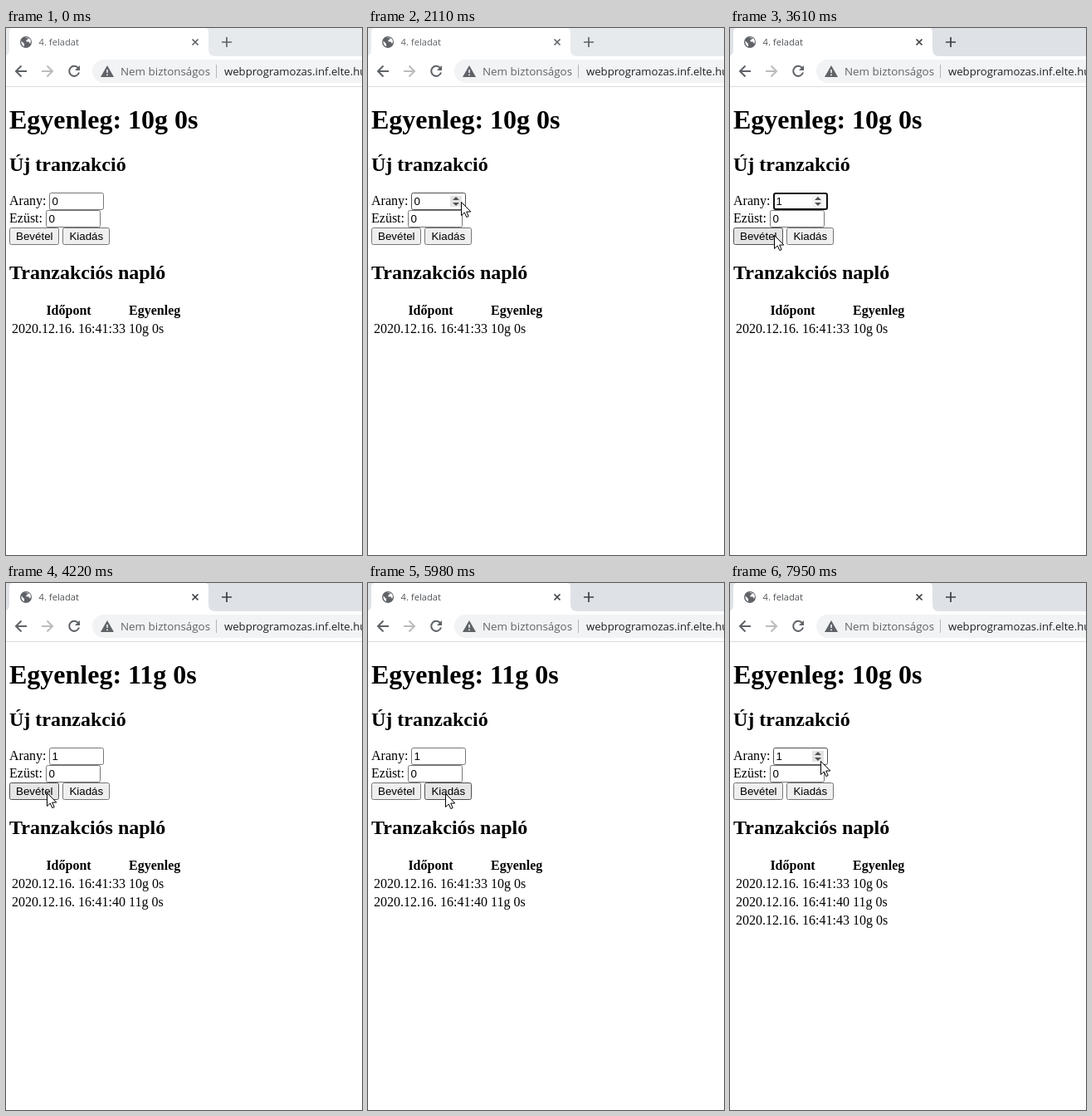
An HTML page that plays this animation: 429 by 634 pixels, repeating every 8000 ms.

```html
<!DOCTYPE html>
<html lang="hu">
<head>
<meta charset="utf-8">
<title>4. feladat</title>
<style>
  html, body { margin: 0; width: 100%; height: 100%; overflow: hidden; background: #fff; }
  svg { display: block; }
  .ui { font: 13.15px "Open Sans", sans-serif; }
  .serif { font: 16px "Liberation Serif", serif; }
  .serif .h1 { font-size: 32px; font-weight: bold; }
  .serif .h2 { font-size: 24px; font-weight: bold; }
  .serif .th { font-weight: bold; text-anchor: middle; }
  .form { font: 13.333px "Liberation Sans", sans-serif; }
  .btn { text-anchor: middle; }
</style>
</head>
<body>
<svg width="429" height="634" viewBox="0 0 429 634">
  <g class="ui">
    <rect id="strip" width="429" height="34"/>
    <path d="M-4 34Q4 34 4 26V5Q4 1 7 0H241Q244 1 244 5V26Q244 34 252 34Z" fill="#fff"/>
    <circle cx="24" cy="17" r="7" fill="#5f6368"/>
    <path d="M18.5 15.5l3.5 3.5v3.2q-4-1.700-3.500-6.700zM22.500 11.600h4v1.900l-2 1v2h3l1.500 2.500q2-3.500-.5-6.300" fill="#fff"/>
    <text id="tabTitle" x="39.600" y="21" font-size="11.2">4. feladat</text>
    <path id="tabIcons" d="M224.500 13.500l7 7m0-7l-7 7M260 17h12M266 11v12" fill="none" stroke-width="1.700"/>
    <rect y="70" width="429" height="1" fill="#dadce0"/>
    <g fill="none" stroke="#5f6368" stroke-width="2">
      <path d="M25 52H12.500M18.500 45.500L12 52l6.500 6.500"/>
      <path d="M43 52H55.500M49.500 45.500L56 52l-6.500 6.500" stroke="#babcbe"/>
      <path d="M87 48.200A6 6 0 1 0 88 53.500"/>
    </g>
    <path d="M89 45v6h-6z" fill="#5f6368"/>
    <rect x="104" y="38" width="345" height="28" rx="14" fill="#f1f3f4"/>
    <path d="M122 45l8 14h-16z" fill="#5f6368"/>
    <path d="M122 50v4m0 1.500v1.700" stroke="#f1f3f4" stroke-width="1.600"/>
    <text x="138" y="57" font-size="13.4" fill="#5f6368">Nem biztonságos</text>
    <rect x="253" y="44" width="1" height="16" fill="#b4b7ba"/>
    <text x="263" y="57" fill="#202124">webprogramozas.inf.elte.hu</text>
  </g>
  <g class="serif">
    <text id="balance" class="h1" x="4" y="121"></text>
    <text class="h2" x="4" y="172">Új tranzakció</text>
    <text x="4" y="213">Arany:</text>
    <text x="4" y="234">Ezüst:</text>
    <text class="h2" x="4" y="302">Tranzakciós napló</text>
    <text class="th" x="75.500" y="345">Időpont</text>
    <text class="th" x="179.200" y="345">Egyenleg</text>
    <g id="log"></g>
  </g>
  <g id="form" class="form"></g>
  <path id="cursor" d="M.5 .5V16.500L4.300 13L6.800 18.600L9.200 17.500L6.700 12H11.800Z" fill="#fff" stroke="#000"/>
</svg>
<script>
const LOOP = 8000;
const $ = id => document.getElementById(id);

// start, end, steps, x, y, easing power
const moves = [
  [400, 1110, 16, 307, 496, 1.5],
  [1158, 1160, 1, 290, 477, 1],
  [1210, 2010, 18, 118, 212, -1.5],
  [2060, 2107, 2, 112, 209, 1],
  [2155, 2250, 3, 106, 203, -1.5],
  [3080, 3607, 12, 53, 249, 0],
  [3655, 3750, 3, 49, 252, -1.5],
  [5370, 5980, 14, 93, 253, 0],
  [7520, 7950, 10, 109, 214, 0]
];
const gold = { x: 52, y: 198, w: 66, h: 21 };
const silver = { x: 48, y: 219, w: 66, h: 21 };
const income = { x: 4, y: 240, w: 60, h: 21, label: 'Bevétel', press: 4070 };
const expense = { x: 68, y: 240, w: 57, h: 21, label: 'Kiadás', press: 6440 };
const rows = [
  [0, '16:41:33', '10g 0s'],
  [4150, '16:41:40', '11g 0s'],
  [6520, '16:41:43', '10g 0s']
];

// power > 0 eases in, < 0 eases out, 0 does both
function ease(u, p) {
  if (!p) return u * u * (3 - 2 * u);
  return p > 0 ? u ** p : 1 - (1 - u) ** -p;
}

function pointer(t) {
  let x = 390, y = 630;
  for (const [a, b, n, tx, ty, p] of moves) {
    if (t < a) break;
    const step = Math.floor((t - a) / (b - a) * (n - 1) + 1.05);
    const u = ease(Math.min(1, step / n), p);
    x += (tx - x) * u;
    y += (ty - y) * u;
  }
  return { x: Math.round(x), y: Math.round(y) };
}

const inside = (p, r) => p.x >= r.x && p.x < r.x + r.w && p.y >= r.y && p.y < r.y + r.h;
const between = (t, a, b) => t >= a && t < b;

function box(r, fill, stroke, width = 1) {
  return `<rect x="${r.x + width / 2}" y="${r.y + width / 2}" width="${r.w - width}" height="${r.h - width}"
    rx="2" fill="${fill}" stroke="${stroke}" stroke-width="${width}"/>`;
}

function field(r, value, hover, focus, pressed) {
  let s = focus ? box(r, '#fff', '#101010', 2) : box(r, '#fff', hover ? '#4f4f4f' : '#767676');
  s += `<text x="${r.x + 3.4}" y="${r.y + 15}">${value}</text>`;
  if (hover || focus) {
    const bg = pressed ? '#d0d0d0' : hover ? '#e4e4e4' : '#f5f5f5';
    s += `<rect x="${r.x + 47}" y="${r.y + 4}" width="14" height="13" fill="${bg}"/>
      <path d="M${r.x + 50} ${r.y + 9}l4-4l4 4zm0 3h8l-4 4z" fill="#505050"/>`;
  }
  return s;
}

function button(r, t, p) {
  const [fill, stroke] = between(t, r.press, r.press + 150) ? ['#f5f5f5', '#8d8d8d']
    : inside(p, r) ? ['#e5e5e5', '#4f4f4f'] : ['#efefef', '#767676'];
  return box(r, fill, stroke) +
    `<text class="btn" x="${r.x + r.w / 2 + 0.3}" y="${r.y + 15}">${r.label}</text>`;
}

function draw(t) {
  const p = pointer(t);
  const active = t >= 2620;
  $('strip').setAttribute('fill', active ? '#dee1e6' : '#e7eaed');
  $('tabTitle').setAttribute('fill', active ? '#505458' : '#5f6368');
  $('tabIcons').setAttribute('stroke', active ? '#3c4043' : '#5f6368');

  const shown = rows.filter(r => t >= r[0]);
  $('balance').textContent = 'Egyenleg: ' + shown[shown.length - 1][2];
  $('log').innerHTML = shown.map(([, time, sum], i) =>
    `<text x="7" y="${367 + 22 * i}">2020.12.16. ${time}</text>
     <text x="148" y="${367 + 22 * i}">${sum}</text>`).join('');

  $('form').innerHTML =
    field(gold, t >= 2690 ? 1 : 0, inside(p, gold), between(t, 2620, 4070), between(t, 2620, 2760)) +
    field(silver, 0, inside(p, silver)) +
    button(income, t, p) + button(expense, t, p);

  $('cursor').setAttribute('visibility', t < 400 ? 'hidden' : 'visible');
  $('cursor').setAttribute('transform', `translate(${p.x} ${p.y})`);
}

function frame() {
  draw(performance.now() % LOOP);
  requestAnimationFrame(frame);
}
frame();
</script>
</body>
</html>
```
